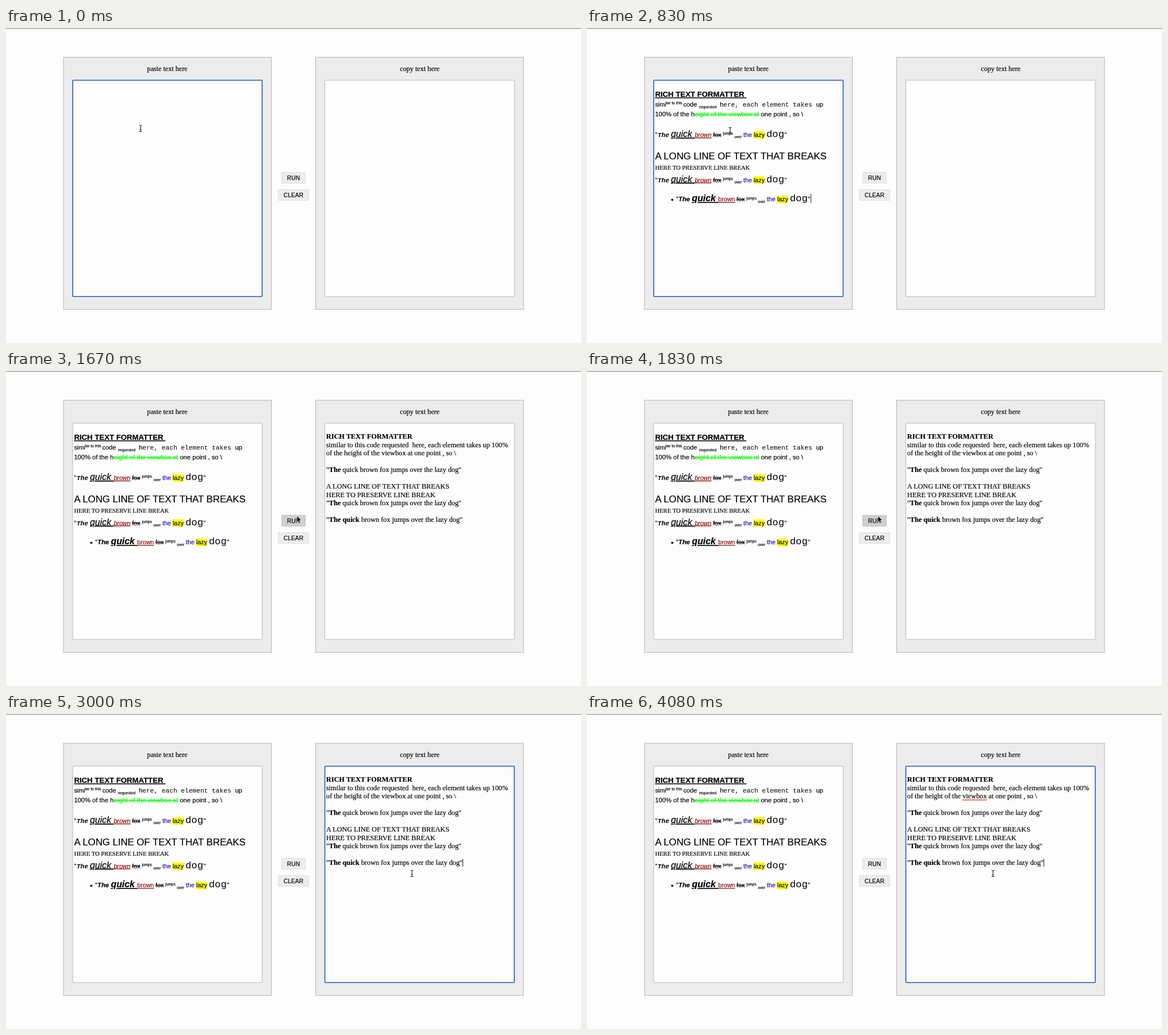
Write an HTML page that moves like this. It is 1000 px wide and 549 px high and loops after 4.16 s.

```html
<!DOCTYPE html>
<html lang="en">
<head>
<meta charset="utf-8">
<title>Rich text formatter</title>
<style>
html, body { margin: 0; width: 100%; height: 100%; overflow: hidden; background: #fdfdfd; }
svg { display: block; width: 1000px; height: 549px; }
text { white-space: pre; color: #000; fill: currentColor; stroke: currentColor; stroke-width: .18; }
.sans { font-family: "Liberation Sans", Arial, sans-serif; }
.serif { font-family: "Liberation Serif", "Times New Roman", serif; }
.mono { font-family: "Liberation Mono", "Courier New", monospace; stroke: none; }
.b { font-weight: bold; }
.i { font-style: italic; }
.u { text-decoration: underline; }
.s { text-decoration: line-through; }
.mid { text-anchor: middle; }
.red { color: #8c0a06; }
.blue { color: #2408a8; }
.green { color: #0f0; }
.panel { fill: #ececec; stroke: #b4b4b8; }
.area { fill: #fdfdfd; stroke: #b8b8b8; }
.area.focus { stroke: #1c60b8; stroke-width: 1.6; }
.button { fill: #ececec; stroke: #e2e2e2; }
.button.held { fill: #e0e0e0; stroke: #d6d6d6; }
.button.hover { fill: #cfcfcf; stroke: #c6c6c6; }
.caret { stroke: #222; }
</style>
</head>
<body>
<svg id="stage" viewBox="0 0 1000 549" xmlns="http://www.w3.org/2000/svg">
  <path d="M0 .5H1000" stroke="#767676"/>
  <rect class="panel" x="100" y="51" width="361.5" height="439.5"/>
  <rect class="panel" x="538.5" y="51" width="361.5" height="439.5"/>
  <rect class="area" id="areaL" x="116" y="91" width="329.5" height="377" rx="1"/>
  <rect class="area" id="areaR" x="554.5" y="91" width="329.5" height="377" rx="1"/>
  <rect class="button" id="run" x="479.5" y="251.5" width="41" height="19"/>
  <rect class="button" x="473.5" y="281.5" width="53" height="19"/>
  <g id="labels"></g>
  <g id="rich"></g>
  <g id="plain"></g>
  <path id="wave" fill="none" stroke="#e0482c" stroke-width="1.1"/>
  <path id="caretTop" class="caret" d="M118.5 93V106"/>
  <path id="caretEnd" class="caret" d="M389.5 289V305"/>
  <path id="caretR" class="caret" d="M794.5 252.5V266"/>
  <path id="beam" d="M-2.5 -5.5Q0 -5.5 0 -4Q0 -5.5 2.5 -5.5M0 -4.5V4.5M-2.5 5.5Q0 5.5 0 4Q0 5.5 2.5 5.5M-1.5 2H1.5" fill="none" stroke="#222" stroke-width="1.1"/>
  <path id="arrow" d="M0 0V11L2.5 8.7L4.3 12.6L6.1 11.8L4.4 8H7.8Z" fill="#000" stroke="#fff" stroke-width=".7"/>
</svg>
<script>
const LOOP = 4160, STEP = 1000 / 12;
const NS = "http://www.w3.org/2000/svg";
const $ = id => document.getElementById(id);

function add(parent, tag, attrs, content) {
  const el = document.createElementNS(NS, tag);
  for (const key in attrs) el.setAttribute(key, attrs[key]);
  if (content) el.textContent = content;
  parent.append(el);
  return el;
}
const write = (parent, x, y, size, cls, content) =>
  add(parent, "text", { x, y, "font-size": size, class: cls }, content);

const labels = $("labels"), rich = $("rich"), plain = $("plain");
write(labels, 280.5, 74.5, 12.2, "serif mid", "paste text here");
write(labels, 719.5, 74.5, 12.2, "serif mid", "copy text here");
write(labels, 500, 264.8, 10.3, "sans mid", "RUN");
write(labels, 500, 294.8, 10.3, "sans mid", "CLEAR");

// shared ending of the three pangram lines
function foxTail(dx, y, brown) {
  const put = (x, dy, size, cls, s) => write(rich, x + dx, y + dy, size, cls, s);
  add(rich, "rect", { x: 289.7 + dx, y: y - 10, width: 19.4, height: 13, fill: "#ff0" });
  put(187.4, 0, 10.7, brown, "brown");
  put(219.3, 0, 10.6, "sans s", "fox");
  put(236.5, -3.6, 6.5, "sans", "jumps");
  put(256.5, 2.2, 6.5, "sans", "over");
  put(272, 0, 10.7, "sans blue", "the");
  put(290, 0, 10.7, "sans", "lazy");
  put(312, 0, 17.2, "mono", "dog");
  put(343.5, 0, 10.7, "sans", '"');
}
function foxLine(y) {
  write(rich, 118.6, y, 10.7, "sans", '"');
  write(rich, 122.8, y, 11.2, "mono b i", "The");
  write(rich, 146, y, 15.8, "sans i u", "quick ");
  foxTail(0, y, "sans i u red");
}

write(rich, 118.4, 120, 13.2, "sans b u", "RICH TEXT FORMATTER ");
write(rich, 118.4, 137.3, 10.9, "sans", "simi");
write(rich, 137.6, 133, 6.9, "sans", "lar to this");
write(rich, 167.4, 137.3, 11.1, "sans", "code");
write(rich, 195, 139.6, 6.8, "sans", "requested");
write(rich, 231.2, 137.3, 11.1, "sans", "h");
write(rich, 237.2, 137.3, 11.2, "mono", "ere, each element takes");
write(rich, 398.4, 137.3, 11.2, "sans", "up");
write(rich, 118.4, 154.3, 11.15, "sans", "100% of the h");
write(rich, 187.5, 154.3, 11.25, "sans s green", "eight of the viewbox at");
write(rich, 302.4, 154.3, 11.2, "sans", "one point , so \\");
foxLine(190);
write(rich, 118.4, 228.8, 16.75, "sans", "A LONG LINE OF TEXT THAT BREAKS");
write(rich, 118.4, 247.4, 10.65, "serif", "HERE TO PRESERVE LINE BREAK");
foxLine(268.5);
add(rich, "circle", { cx: 148.3, cy: 299.3, r: 1.9 });
write(rich, 155, 302.3, 10.7, "sans", '"');
write(rich, 159, 302.3, 11.3, "sans b i", "The");
write(rich, 182.5, 302.3, 15.8, "sans b i u", "quick ");
foxTail(40.8, 302.3, "sans u red");

// [row, bold opening, rest]
const rest = " brown fox jumps over the lazy dog\"";
[
  [0, "RICH TEXT FORMATTER", ""],
  [1, "", "similar to this code requested  here, each element takes up 100%"],
  [2, "", "of the height of the viewbox at one point , so \\"],
  [4, "The", " quick" + rest],
  [6, "", "A LONG LINE OF TEXT THAT BREAKS"],
  [7, "", "HERE TO PRESERVE LINE BREAK"],
  [8, "The", " quick" + rest],
  [10, "The quick", rest]
].forEach(([row, bold, tail]) => {
  const line = write(plain, 556.8, 118 + 14.52 * row, 12.25, "serif");
  if (row > 2 && bold) add(line, "tspan", {}, '"');
  if (bold) add(line, "tspan", { class: "b" }, bold);
  if (tail) add(line, "tspan", {}, tail);
});

let zig = "M653 150.5";
for (let x = 655; x <= 695; x += 2) zig += `L${x} ${x % 4 === 3 ? 149 : 150.5}`;
$("wave").setAttribute("d", zig);

// pointer stops: [step, x, y]
const stops = [
  [0, 234, 175], [9, 234, 175], [16, 504, 243.5], [18, 506, 252.5],
  [23, 506, 252.5], [31, 685, 276.5], [33, 685, 276.5], [36, 706, 278], [50, 706, 278]
];
function pointer(k) {
  let n = 0;
  while (n < stops.length - 2 && k >= stops[n + 1][0]) n++;
  const [k0, x0, y0] = stops[n], [k1, x1, y1] = stops[n + 1];
  const p = Math.min(1, (k - k0) / (k1 - k0)), e = p * p * (3 - 2 * p);
  return [x0 + (x1 - x0) * e, y0 + (y1 - y0) * e];
}

const show = (el, on) => { el.style.display = on ? "" : "none"; };
const within = (k, from, to) => k >= from && k < to;

function draw(ms) {
  const k = Math.floor((ms % LOOP + 4) / STEP);
  const [x, y] = pointer(k);
  const overText = x < 446 || x > 554;
  for (const [id, on] of [["beam", overText], ["arrow", !overText]]) {
    $(id).setAttribute("transform", `translate(${x} ${y})`);
    show($(id), on);
  }
  show(rich, k >= 9);
  show(plain, k >= 20);
  show($("wave"), k >= 44);
  show($("caretTop"), within(k, 4, 9));
  show($("caretEnd"), within(k, 9, 15));
  show($("caretR"), within(k, 36, 42) || k >= 48);
  $("areaL").classList.toggle("focus", k < 19);
  $("areaR").classList.toggle("focus", k >= 36);
  $("run").classList.toggle("hover", within(k, 18, 24));
  $("run").classList.toggle("held", within(k, 24, 36));
}

const start = performance.now();
function tick() {
  draw(performance.now() - start);
  requestAnimationFrame(tick);
}
tick();
</script>
</body>
</html>
```
